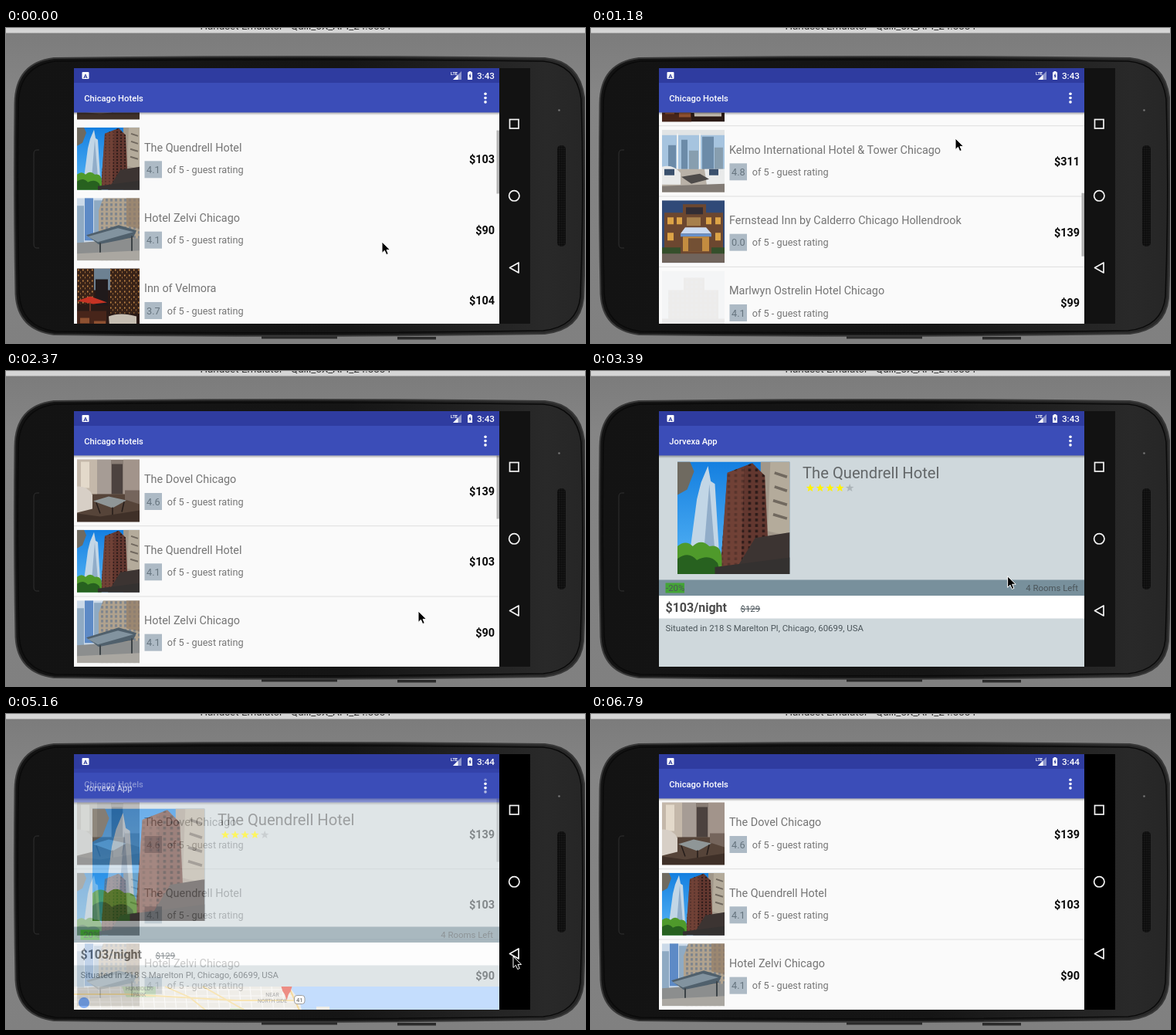
An HTML page that plays this animation: 750 by 408 pixels, repeating every 7690 ms.

```html
<!DOCTYPE html>
<html lang="en">
<head>
<meta charset="utf-8">
<title>Hotel list demo</title>
<style>
  html, body { margin: 0; width: 100%; height: 100%; overflow: hidden; background: #828282; }
  svg { display: block; }
  text { font-family: Roboto, "Noto Sans", sans-serif; }
  .end { text-anchor: end; }
  .mid { text-anchor: middle; }
  .bar { font-size: 11.2px; font-weight: 500; fill: #fff; }
  .name { font-size: 14.4px; fill: #757575; }
  .rate { font-size: 12.7px; fill: #757575; }
  .score { font-size: 12.7px; fill: #66747e; }
  .price { font-size: 14.4px; font-weight: 700; fill: #0a0a0a; }
  .small { font-size: 11.4px; fill: #4b555a; }
  .place { font-size: 6.8px; fill: #777; }
</style>
</head>
<body>
<svg id="stage" width="750" height="408" viewBox="0 0 750 408">
  <defs>
    <clipPath id="screen"><rect x="88" y="52" width="551" height="331"/></clipPath>
    <clipPath id="pane"><rect x="88" y="109.5" width="551" height="273.5"/></clipPath>
    <linearGradient id="desk" x2="0" y2="1"><stop stop-color="#7b7b7b"/><stop offset=".2" stop-color="#858585"/><stop offset="1" stop-color="#808080"/></linearGradient>
    <linearGradient id="gloss"><stop stop-color="#131313"/><stop offset=".58" stop-color="#151515"/><stop offset=".93" stop-color="#292929"/><stop offset="1" stop-color="#262626"/></linearGradient>
    <linearGradient id="drop" x2="0" y2="1"><stop stop-color="#000" stop-opacity=".32"/><stop offset="1" stop-color="#000" stop-opacity="0"/></linearGradient>
    <linearGradient id="sky" x2="0" y2="1"><stop stop-color="#147fe0"/><stop offset="1" stop-color="#58b6f6"/></linearGradient>
    <pattern id="mesh" width="3" height="3" patternUnits="userSpaceOnUse"><circle cx="1.5" cy="1.5" r="1.2" fill="#0b0b0b"/></pattern>
    <pattern id="bricks" width="5" height="4" patternUnits="userSpaceOnUse"><path d="M1 1h2v2h-2z" fill="#2d1b19"/></pattern>
    <pattern id="panes" width="6" height="6" patternUnits="userSpaceOnUse"><path d="M1 1h3v3.500h-3z" fill="#7f858c"/></pattern>
    <pattern id="lights" width="6" height="7" patternUnits="userSpaceOnUse"><path d="M1 1h1.500v2h-1.500zM4 4h1v1.500h-1z" fill="#c98b48"/></pattern>

    <symbol id="p0" viewBox="0 0 81 81" preserveAspectRatio="none">
      <path d="M0 0h81v81H0z" fill="#887c74"/>
      <path d="M0 0h26v46H0z" fill="#c4b8aa"/>
      <path d="M5 3h11v34H5z" fill="#e3d9ca"/>
      <path d="M26 0h18v45H26z" fill="#a69c95"/>
      <path d="M45 6h14v39H45z" fill="#4c423f"/>
      <path d="M60 0h21v48H60z" fill="#a2948b"/>
      <path d="M0 45h81v36H0z" fill="#564439"/>
      <path d="M0 35q14-1 20 11v18L0 69z" fill="#d7cfc6"/>
      <path d="M62 40h19v18l-19-6z" fill="#75655c"/>
      <path d="M21 54l20-6 23 5-18 10z" fill="#8f9697"/>
      <path d="M25 56l5 14M46 62v13M61 55l-3 13" stroke="#251d1a" stroke-width="1.500"/>
      <path d="M0 70l30 4 51-8v15H0z" fill="#3f3028"/>
    </symbol>
    <symbol id="p1" viewBox="0 0 81 81" preserveAspectRatio="none">
      <path d="M0 0h81v81H0z" fill="url(#sky)"/>
      <path d="M0 0h9l3 7L7 20 0 24z" fill="#6f6a60"/>
      <path d="M22 3l2 11 3 2 3 49H9l5-38 3-12z" fill="#c2d6e6"/>
      <path d="M23 16l4 49H19z" fill="#91adc9"/>
      <path d="M60 0h21v81H60z" fill="#a1978a"/>
      <path d="M67 0l-2 50 16 4V0z" fill="#b4ab9b"/>
      <path d="M70 8l9 3M70 18l9 3M69 28l10 3M69 38l10 3" stroke="#71695f" stroke-width="2"/>
      <path d="M36 8L54 1l9 9 3 63-35 5z" fill="#62372f"/>
      <path d="M36 8L54 1l9 9 3 63-35 5z" fill="url(#bricks)"/>
      <path d="M36 8L48 4l-2 72-15 2z" fill="#7d493d" opacity=".55"/>
      <path d="M56 55l25-4v30H40z" fill="#3c3432"/>
      <path d="M0 61q6-5 11 0 6-6 12 0 9-2 9 10v10H0z" fill="#4f9a2b"/>
      <path d="M0 70q8-6 14 1 9-5 15 2l2 8H0z" fill="#27611f"/>
      <path d="M27 76l54-7v12H27z" fill="#343130"/>
    </symbol>
    <symbol id="p2" viewBox="0 0 81 81" preserveAspectRatio="none">
      <path d="M0 0h81v81H0z" fill="#cbd9e8"/>
      <path d="M0 10h9v62H0zM22 3h11v45H22z" fill="#8faac3"/>
      <path d="M10 0h11v55H10z" fill="#5d8ac6"/>
      <path d="M34 0h47v81H28V16z" fill="#b0a28e"/>
      <path d="M34 0h47v81H28V16z" fill="url(#panes)"/>
      <path d="M64 0h17v40l-17-4z" fill="#937d65" opacity=".7"/>
      <path d="M0 58l81-6v29H0z" fill="#8c8e8e"/>
      <path d="M12 48L54 35l23 7-4 9-45 9z" fill="#50606c"/>
      <path d="M14 50l39-11 20 5-46 13z" fill="#82939f"/>
      <path d="M30 58v17M71 49v25" stroke="#3c4347" stroke-width="2"/>
      <path d="M0 72l81-4v13H0z" fill="#aaa7a1"/>
    </symbol>
    <symbol id="p3" viewBox="0 0 81 81" preserveAspectRatio="none">
      <path d="M0 0h81v81H0z" fill="#2a1a16"/>
      <path d="M20 0h25v28H20z" fill="#6d8192"/>
      <path d="M0 0h22v46H0zM43 0h38v58H43z" fill="#392318"/>
      <path d="M0 0h22v46H0zM43 0h38v58H43z" fill="url(#lights)"/>
      <path d="M24 14h16v34H24z" fill="#201a1b"/>
      <path d="M0 42l17-6 22 8-18 2z" fill="#c63324"/>
      <path d="M17 44v27" stroke="#7b3b29" stroke-width="1.500"/>
      <path d="M0 55h38v26H0z" fill="#47251a"/>
      <path d="M41 62q15-6 36 0v12H42z" fill="#c6beb2"/>
      <path d="M4 64h12v7H4zM22 68h15v7H22z" fill="#8e5131"/>
    </symbol>
    <symbol id="p4" viewBox="0 0 81 81" preserveAspectRatio="none">
      <path d="M0 0h81v81H0z" fill="#e1e4e5"/>
      <path d="M0 7h81v44H0z" fill="#a6c4df"/>
      <path d="M8 20h10v32H8zM25 13h8v38h-8zM52 9h15v44H52z" fill="#6c8ba8"/>
      <path d="M35 27h12v25H35zM68 23h11v31H68z" fill="#879eaf"/>
      <path d="M20 5v48M49 5v48" stroke="#edf0f0" stroke-width="2"/>
      <path d="M0 51h81v30H0z" fill="#b9b1a7"/>
      <path d="M0 48q14-4 24 8v15H0zM55 51h26v21H58z" fill="#e9eaea"/>
      <path d="M3 51h13v8H3zM61 51h12v8H61z" fill="#3a506d"/>
      <path d="M25 61l24-4 12 7-23 6z" fill="#4e4b4a"/>
      <path d="M0 73l81-3v11H0z" fill="#827b75"/>
    </symbol>
    <symbol id="p5" viewBox="0 0 81 81" preserveAspectRatio="none">
      <path d="M0 0h81v81H0z" fill="#304a78"/>
      <path d="M3 16h24V5h30v11h22v54H3z" fill="#6c4730"/>
      <path d="M31 9h22v9H31z" fill="#322d35"/>
      <path d="M7 22h8v9H7zM19 22h7v9h-7zM57 22h7v9h-7zM69 22h7v9h-7zM7 42h8v10H7zM69 42h7v10h-7z" fill="#dda346"/>
      <path d="M32 22h18v11H32z" fill="#a7804d"/>
      <path d="M24 43l6-8h27l7 8z" fill="#cbdaf0"/>
      <path d="M24 43h40v4H24z" fill="#6991c9"/>
      <path d="M27 47h34v19H27z" fill="#c38c40"/>
      <path d="M34 49h18v17H34z" fill="#735034"/>
      <path d="M0 61h24v9H0zM64 61h17v9H64z" fill="#354f2b"/>
      <path d="M0 69h81v12H0z" fill="#70645c"/>
    </symbol>
    <symbol id="p6" viewBox="0 0 81 81" preserveAspectRatio="none">
      <path d="M0 0h81v81H0z" fill="#c9d2d9"/>
      <path d="M8 25h20V9h27v16h18v51H8z" fill="#88786c"/>
      <path d="M8 25h20V9h27v16h18v51H8z" fill="url(#panes)"/>
      <path d="M0 62h81v19H0z" fill="#6c6863"/>
    </symbol>
  </defs>

  <path d="M0 0h750v408H0z" fill="url(#desk)"/>
  <path d="M0 0h750v6.500H0z" fill="#d5d5d5"/>
  <text x="375" y="2" class="mid" font-size="13.400" fill="#333">Handset Emulator - Quill_5X_API_24:5554</text>

  <path d="M331 399h98v3.500h-98zM507 400h50v3.500h-50z" fill="#2a2a2a"/>
  <path d="M11.500 98Q12 45 62 39Q380 35 698 39Q743 43 749 90Q753 215 748 350Q744 391 698 396Q380 401 62 397Q15 391 12.500 345Q10 215 11.500 98z" fill="url(#gloss)" stroke="#383838" stroke-width="2"/>
  <path d="M16 98Q17 49 64 43Q380 39 696 43Q739 47 745 92Q749 215 744 348Q740 387 696 392Q380 397 64 393Q19 387 17 343Q14 215 16 98z" fill="none" stroke="#0a0a0a" stroke-width="1.500"/>
  <path d="M43 158h-3q-4 0-4 5v117q0 5 4 5h3" fill="none" stroke="#303030"/>
  <rect x="714" y="152" width="11" height="131" rx="5" fill="#181818"/>
  <rect x="714" y="152" width="11" height="131" rx="5" fill="url(#mesh)"/>
  <circle cx="716.500" cy="106.500" r="1.300" fill="#777"/>
  <path id="nav" d="M639 52h40v331h-40z" fill="#121212"/>
  <g fill="none" stroke="#f4f4f4" stroke-width="1.700">
    <rect x="652.500" y="118.500" width="11.500" height="11.500"/>
    <circle cx="658.300" cy="217.300" r="6.700"/>
    <path d="M652.500 310.500l11.500-6.500v13z" stroke-linejoin="round"/>
  </g>

  <g clip-path="url(#screen)">
    <g id="home"></g>
    <g id="detail"></g>
    <rect x="98.500" y="57" width="9" height="9" rx="1" fill="#fff"/>
    <text x="103" y="64.800" class="mid" font-size="8" font-weight="700" fill="#303f9f">A</text>
    <text x="576" y="60.500" font-size="5.500" font-weight="700" fill="#fff">LTE</text>
    <path d="M590 56v11h-11z" fill="#fff" opacity=".45"/>
    <path d="M585.500 60.500V67H579z" fill="#fff"/>
    <path d="M598 57.200h1.500V56h3v1.200h1.500V67h-6z" fill="#fff"/>
    <path d="M601.600 58.500l-2.300 4h1.400v3l2.200-4h-1.300z" fill="#303f9f"/>
    <text id="clock" x="633" y="65.800" class="end" font-size="11.700" font-weight="500" fill="#fff"></text>
  </g>
  <path id="cursor" d="M0 0v14.500l3.400-3.200 2.300 5.300 2.600-1.100-2.300-5.100h4.600z" fill="#000" stroke="#fff" stroke-width="1"/>
</svg>

<script>
const $ = id => document.getElementById(id);
const LOOP = 7690, STEP = 147.6, LAST = 46;
const ROW = 91.33, TOP = 109.5, PANE = 273.5;

const hotels = [
  ["The Dovel Chicago", "4.6", 139],
  ["The Quendrell Hotel", "4.1", 103],
  ["Hotel Zelvi Chicago", "4.1", 90],
  ["Inn of Velmora", "3.7", 104],
  ["Kelmo International Hotel & Tower Chicago", "4.8", 311],
  ["Fernstead Inn by Calderro Chicago Hollendrook", "0.0", 139],
  ["Marlwyn Ostrelin Hotel Chicago", "4.1", 99]
];

const rect = (x, y, w, h, fill) => `<rect x="${x}" y="${y}" width="${w}" height="${h}" fill="${fill}"/>`;
const text = (x, y, cls, str, extra = "") =>
  `<text x="${x}" y="${y}" class="${cls}" ${extra}>${str.replace("&", "&amp;")}</text>`;
const photo = (i, x, y, size) =>
  `<use href="#p${i}" x="${x}" y="${y}" width="${size}" height="${size}" class="photo${i}"/>`;

const header = title =>
  rect(88, 52, 551, 19.5, "#2f3ca0") + rect(88, 71, 551, 38.5, "#3b4db8") +
  rect(88, 109.5, 551, 3.5, "url(#drop)") + text(101.3, 94.6, "bar", title) +
  [85.3, 90.6, 95.9].map(y => `<circle cx="621" cy="${y}" r="1.8" fill="#fff"/>`).join("");

const row = ([name, score, price], i) => `<g transform="translate(0 ${TOP + i * ROW})">` +
  photo(i, 92, 5, 81) + text(179, 35.8, "name", name) +
  rect(179.5, 48.5, 22.5, 22, "#adbac5") + text(182, 64.2, "score", score) +
  text(208.8, 64.2, "rate", "of 5 - guest rating") +
  text(633, 51.5, "price end", "$" + price) +
  `<path class="line" d="M88 91.200h551" stroke="#dedede"/></g>`;

$("home").innerHTML = rect(88, 52, 551, 331, "#fafafa") +
  `<g clip-path="url(#pane)"><g id="list">${hotels.map(row).join("")}</g></g>` +
  `<rect id="thumb" x="635.5" width="3.5" height="82" fill="#b4b4b4"/>` + header("Chicago Hotels");

function star(cx, cy, fill) {
  let d = "";
  for (let i = 0; i < 10; i++) {
    const r = i % 2 ? 2.3 : 5.6, a = i * Math.PI / 5;
    d += (i ? "L" : "M") + (cx + r * Math.sin(a)).toFixed(1) + " " + (cy - r * Math.cos(a)).toFixed(1);
  }
  return `<path d="${d}z" fill="${fill}"/>`;
}

function map() {
  let streets = "";
  for (let x = 92; x < 372; x += 14) streets += `M${x} 348l3 35`;
  for (let y = 352; y < 383; y += 8) streets += `M88 ${y}h285`;
  return `<g id="map">` + rect(88, 348, 551, 35, "#e9e5dd") +
    `<path d="${streets}" stroke="#fbfaf7" stroke-width="1.2"/>` +
    `<path d="M150 348h44v14h-38zM290 376h18v7h-18z" fill="#cbe3b5"/>` +
    `<path d="M206 348l32 14 26 21M255 348l62 35M88 358h70l140 8h75" fill="none" stroke="#f7d98b" stroke-width="1.8"/>` +
    `<path d="M367 348h272v35H419v-9h-17v9h-18l-4-17z" fill="#a3ccff"/>` +
    `<path d="M366 348l16 35" stroke="#f3c866" stroke-width="2"/>` +
    text(173, 352.5, "place mid", "HUMBOLDT") + text(173, 361, "place mid", "PARK") +
    text(345, 360.5, "place mid", "NEAR") + text(345, 368.5, "place mid", "NORTH SIDE") +
    `<rect x="373.500" y="359.500" width="13.500" height="11" rx="3.500" fill="#fff" stroke="#666"/>` +
    text(380.2, 367.8, "mid", "41", 'font-size="7.500" font-weight="700" fill="#444"') +
    `<path d="M356.500 348h14q-1 6-4.500 10l-2.500 8-2.500-8q-3.500-4-4.500-10z" fill="#e64b3c"/>` +
    `<circle cx="101" cy="369" r="7" fill="#4285f4"/></g>`;
}

$("detail").innerHTML = rect(88, 109, 551, 274, "#cfd8dc") +
  photo(1, 112, 117.5, 145.5) +
  text(274, 139.3, "", "The Quendrell Hotel", 'font-size="20.200" fill="#636769"') +
  [0, 1, 2, 3, 4].map(i => star(284 + i * 12.8, 151.6, i < 4 ? "#fff200" : "#adb5b9")).join("") +
  rect(88, 270.5, 551, 20.5, "#78909c") + rect(96.5, 274.5, 24.5, 13, "#43a536") +
  text(97, 285, "small", "-20%") + text(631, 285, "small end", "4 Rooms Left") +
  rect(88, 291, 551, 29.5, "#fff") +
  text(96.5, 312, "", "$103/night", 'font-size="16" font-weight="700" fill="#4b4b4b"') +
  text(193.5, 311.8, "small", "$129", 'text-decoration="line-through"') +
  text(96.5, 337, "small", "Situated in 218 S Marelton Pl, Chicago, 60699, USA") +
  map() + header("Jorvexa App");

// Smooth curve through [time, value] points that never overshoots.
function curve(pts) {
  const n = pts.length;
  const slope = pts.slice(1).map((p, i) => (p[1] - pts[i][1]) / (p[0] - pts[i][0]));
  const tan = pts.map((_, i) => {
    const a = slope[Math.max(i - 1, 0)], b = slope[Math.min(i, n - 2)];
    return a * b > 0 ? 2 * a * b / (a + b) : 0;
  });
  return t => {
    if (t <= pts[0][0]) return pts[0][1];
    const i = pts.findIndex(p => p[0] >= t) - 1;
    if (i < 0) return pts[n - 1][1];
    const [t0, v0] = pts[i], [t1, v1] = pts[i + 1];
    const h = t1 - t0, u = (t - t0) / h, w = 1 - u;
    return w * w * (1 + 2 * u) * v0 + u * u * (3 - 2 * u) * v1 +
      h * u * w * (w * tan[i] - u * tan[i + 1]);
  };
}

const scroll = curve([[0, 77], [300, 150], [740, 290], [1181, 348], [1330, 338], [1919, 100], [2361, 0]]);
const thumbFade = curve([[2700, 1], [3000, 0], [4900, 0], [5020, 1], [5850, 1], [6150, 0]]);
const cursorX = curve([[0, 487], [1181, 472], [1919, 514], [2361, 534], [2800, 538], [3200, 538],
  [3985, 559], [4720, 657], [5850, 657], [6500, 702]]);
const cursorY = curve([[0, 277], [590, 190], [1181, 143], [1919, 190], [2361, 311], [2800, 250], [3200, 250],
  [3985, 353], [4720, 314], [5850, 314], [6500, 250]]);
const clamp = v => Math.min(1, Math.max(0, v));

function detailPose(t) {
  const enter = clamp((t - 3050) / 340), leave = clamp((t - 5040) / 250);
  return {
    y: 26 * ((1 - enter) ** 3 + leave ** 2.4),
    alpha: clamp(enter * 1.6) * (1 - leave ** 1.4)
  };
}

function pose(t) {
  const s = scroll(t), d = detailPose(t);
  $("list").setAttribute("transform", `translate(0 ${-s})`);
  $("list").querySelectorAll(".line").forEach(l => l.setAttribute("opacity", s > 5 && s < 200 ? 0 : 1));
  $("list").querySelector(".photo6").setAttribute("opacity", clamp((t - 1150) / 300));
  $("thumb").setAttribute("y", TOP + s * PANE / (10 * ROW));
  $("thumb").setAttribute("opacity", thumbFade(t));
  $("detail").setAttribute("transform", `translate(0 ${d.y})`);
  $("detail").setAttribute("opacity", d.alpha);
  $("map").setAttribute("opacity", t < 3680 ? 0 : 1);
  $("clock").textContent = t < 3830 ? "3:43" : "3:44";
  $("nav").setAttribute("fill", t < 5000 ? "#121212" : "#000");
  $("cursor").setAttribute("transform", `translate(${cursorX(t)} ${cursorY(t)})`);
  $("cursor").setAttribute("opacity", t < 6600 ? 1 : 0);
}

// The picture advances in even steps, then rests on the last one.
const start = performance.now();
function tick() {
  const t = (performance.now() - start) % LOOP;
  pose(Math.min(LAST, Math.floor((t + 8) / STEP)) * STEP);
  requestAnimationFrame(tick);
}
tick();
</script>
</body>
</html>
```
